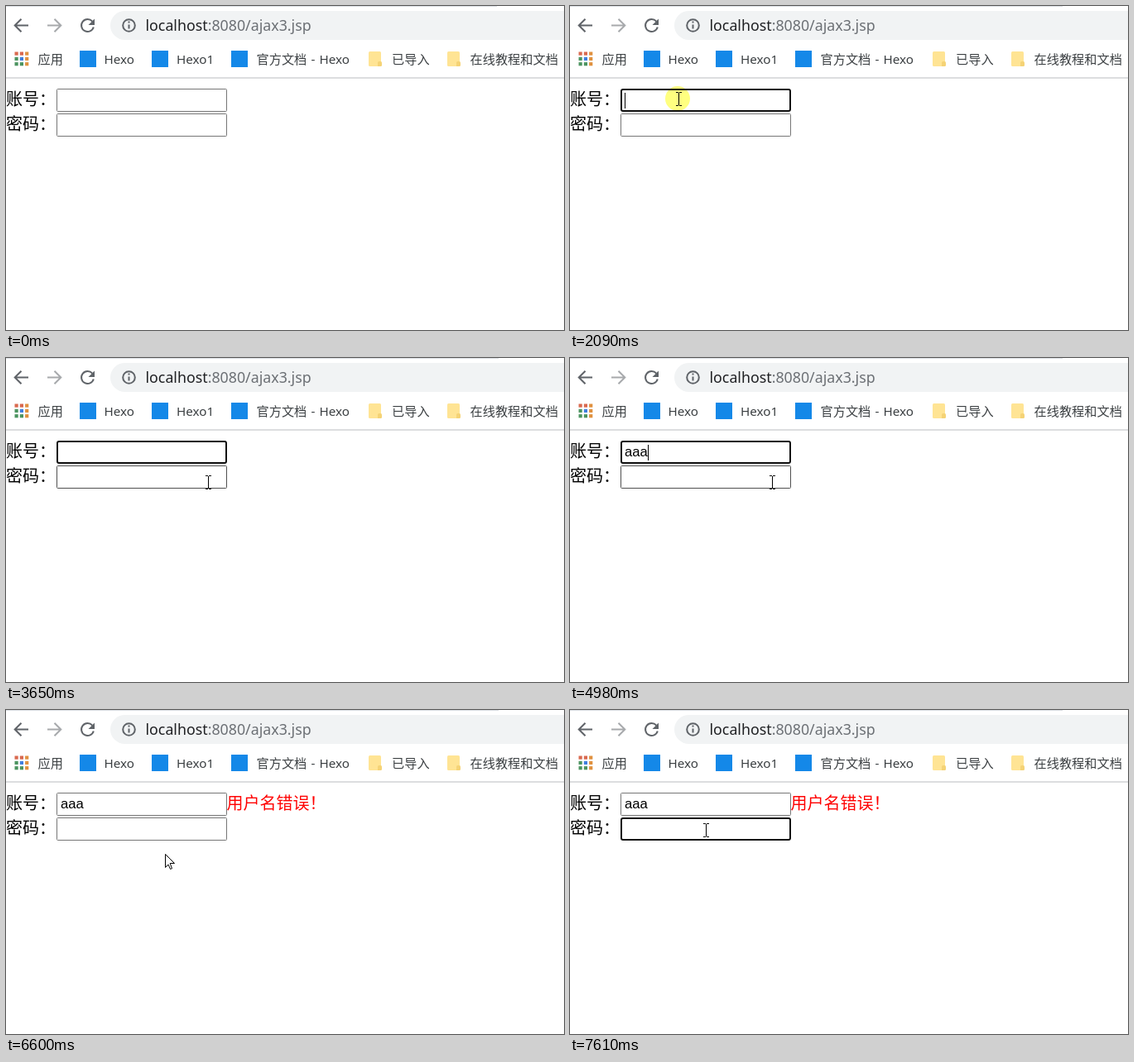
An HTML page for the animation above (8 s loop, 674 px wide and 392 px high).

```html
<!DOCTYPE html>
<html lang="zh-CN">
<head>
<meta charset="utf-8">
<title>Login form check</title>
<style>
  html, body { margin: 0; width: 100%; height: 100%; overflow: hidden; background: #fff; }
  svg { display: block; }
  text { font-family: "Noto Sans", "Noto Sans CJK SC", "Noto Sans CJK", sans-serif; white-space: pre; }
  .mark { font-size: 15.2px; word-spacing: 1.2px; fill: #3c4043; }
  .label { font-size: 20px; font-weight: 350; }
  .typed { font: 16.67px "Liberation Sans", Arial, sans-serif; }
  .icon { fill: none; stroke: #5f6368; stroke-width: 2; }
  .field { fill: #fff; stroke: #767676; }
  .field.hover { stroke: #4f4f4f; }
  .field.focus { stroke: #101010; stroke-width: 2; }
  #click { fill: #ffff80; mix-blend-mode: multiply; }
</style>
</head>
<body>
<svg width="674" height="392" viewBox="0 0 674 392">
  <defs>
    <g id="folder">
      <rect width="15" height="18" rx="1.5" fill="#ffe494"/>
      <path d="M11 18v-4.500q0-1.500 1.500-1.500h2q1.500 0 1.500 1.500v3q0 1.500-1.500 1.500z" fill="#f5d376"/>
    </g>
    <path id="left" d="M27 23.500H11M18.500 15.700L10.700 23.500l7.800 7.800"/>
  </defs>

  <rect id="edge" width="593" height="1" fill="#dee1e6"/>
  <rect x="126" y="6" width="600" height="35" rx="17.500" fill="#f1f3f4"/>
  <rect y="86" width="674" height="2" fill="#dcdddf"/>

  <g class="icon">
    <use href="#left"/>
    <use href="#left" transform="matrix(-1 0 0 1 77 0)" opacity=".55"/>
    <path d="M104.300 18.700A7.500 7.500 0 1 0 105.800 25.500"/>
    <circle cx="148.500" cy="23.500" r="7.300"/>
    <path d="M148.500 22.500v5M148.500 18.500v2"/>
  </g>
  <path d="M107 15.500v7.500h-7.500z" fill="#5f6368"/>
  <text x="168.500" y="30" font-size="17.800" fill="#202124">localhost<tspan fill="#6b6f74">:8080/ajax3.jsp</tspan></text>

  <g id="apps"></g>
  <g fill="#1488e8">
    <rect x="89" y="54" width="20" height="20"/>
    <rect x="176" y="54" width="20" height="20"/>
    <rect x="272" y="54" width="20" height="20"/>
  </g>
  <use href="#folder" x="438" y="55"/>
  <use href="#folder" x="533" y="55"/>
  <g class="mark">
    <text x="38.500" y="70">应用</text>
    <text x="118.500" y="70">Hexo</text>
    <text x="206" y="70">Hexo1</text>
    <text x="302.500" y="70">官方文档 - Hexo</text>
    <text x="466" y="70">已导入</text>
    <text x="560.500" y="70">在线教程和文档</text>
  </g>

  <g class="label">
    <text y="119.500">账号：</text>
    <text y="149.500">密码：</text>
    <text id="error" x="266.500" y="119.500" fill="#f00">用户名错误！</text>
  </g>
  <rect id="account" class="field"/>
  <rect id="password" class="field"/>
  <text id="typed" class="typed" x="66" y="119"></text>
  <rect id="caret" width="1" height="19"/>

  <circle id="click" r="15"/>
  <path id="arrow" d="M.5.5V16.500L4 13 6.500 18.500 8.500 17.700 6.200 11.500H11.500z" fill="#fff" stroke="#000"/>
  <path id="beam" d="M-2-7.500h3M2-7.500h3M-2 8.500h3M2 8.500h3M1.500-7v15" fill="none" stroke="#000"/>
</svg>
<script>
const LOOP = 8000, STEP = 67.5;
const $ = id => document.getElementById(id);
const within = (t, a, b) => t >= a && t < b;
const show = (el, on) => el.setAttribute('visibility', on ? 'visible' : 'hidden');
const place = (el, x, y) => el.setAttribute('transform', `translate(${x} ${y})`);
const set = (el, attrs) => { for (const k in attrs) el.setAttribute(k, attrs[k]); };

// Pointer strokes: start time, then [step, x, y] points
const moves = [
  { start: 860, path: [[0, 424, 336], [3, 310, 255], [5, 180, 166], [6, 157, 130], [9, 130, 112]] },
  { start: 2440, path: [[0, 137, 115], [4, 257, 163], [6, 287, 168], [8, 281, 166], [11, 262, 155]] },
  { start: 3320, path: [[0, 260, 155]] },
  { start: 3510, path: [[0, 257, 154], [2, 243, 150]] },
  { start: 5500, path: [[0, 247, 154], [2, 268, 192], [4, 292, 246], [5, 294, 250]] },
  { start: 6330, path: [[0, 291, 249], [2, 248, 222], [4, 192, 174], [6, 170, 152], [8, 163, 145]] }
];
const clicks = [[2020, 2170], [5850, 6000], [7080, 7220]];
const carets = [[2020, 2580], [3110, 3650], [4180, 5500], [7080, 7610]];
const keys = [4520, 4710, 4980];
const fields = [
  { el: $('account'), y: 100, focus: [2020, 5850] },
  { el: $('password'), y: 130, focus: [7080, LOOP] }
];

const tiles = ['#d9694f', '#d9694f', '#e0913f', '#4c9460', '#3f7fe0', '#e0913f', '#4c9460', '#4c9460', '#e0913f'];
tiles.forEach((fill, i) => {
  const tile = document.createElementNS('http://www.w3.org/2000/svg', 'rect');
  set(tile, { x: 10.5 + i % 3 * 6.3, y: 55.5 + Math.floor(i / 3) * 6.3, width: 4.2, height: 4.2, fill });
  $('apps').append(tile);
});

function pointerAt(t) {
  const move = moves.filter(m => t >= m.start).pop();
  if (!move) return null;
  const { start, path } = move;
  const step = Math.floor((t - start) / STEP);
  const i = path.findIndex(p => p[0] > step);
  if (i < 0) return path[path.length - 1].slice(1);
  const [s0, x0, y0] = path[i - 1], [s1, x1, y1] = path[i];
  const k = (step - s0) / (s1 - s0);
  return [Math.round(x0 + (x1 - x0) * k), Math.round(y0 + (y1 - y0) * k)];
}

function draw(t) {
  const pointer = pointerAt(t);
  let overField = false, focused = null;

  for (const f of fields) {
    const focus = within(t, ...f.focus);
    const hover = !!pointer && within(pointer[0], 61, 267) && within(pointer[1], f.y, f.y + 28);
    const inset = focus ? 1 : 0.5;
    set(f.el, {
      class: 'field' + (focus ? ' focus' : hover ? ' hover' : ''),
      x: 61 + inset, y: f.y + inset, width: 206 - 2 * inset, height: 28 - 2 * inset, rx: focus ? 2 : 1
    });
    overField = overField || hover;
    if (focus) focused = f;
  }

  const count = keys.filter(k => t >= k).length;
  $('typed').textContent = 'a'.repeat(count);
  show($('error'), t >= 6130);
  $('edge').setAttribute('width', t < 2090 ? 593 : 595);

  show($('caret'), focused && carets.some(c => within(t, ...c)));
  if (focused) {
    const offset = focused === fields[0] ? Math.round(count * 9.27) : 0;
    place($('caret'), 66 + offset, focused.y + (focused === fields[0] ? 5 : 4));
  }

  show($('click'), clicks.some(c => within(t, ...c)));
  show($('arrow'), pointer && !overField);
  show($('beam'), pointer && overField);
  if (pointer) for (const id of ['click', 'arrow', 'beam']) place($(id), ...pointer);
}

const origin = performance.now();
function tick() {
  draw((performance.now() - origin) % LOOP);
  requestAnimationFrame(tick);
}
tick();
</script>
</body>
</html>
```
